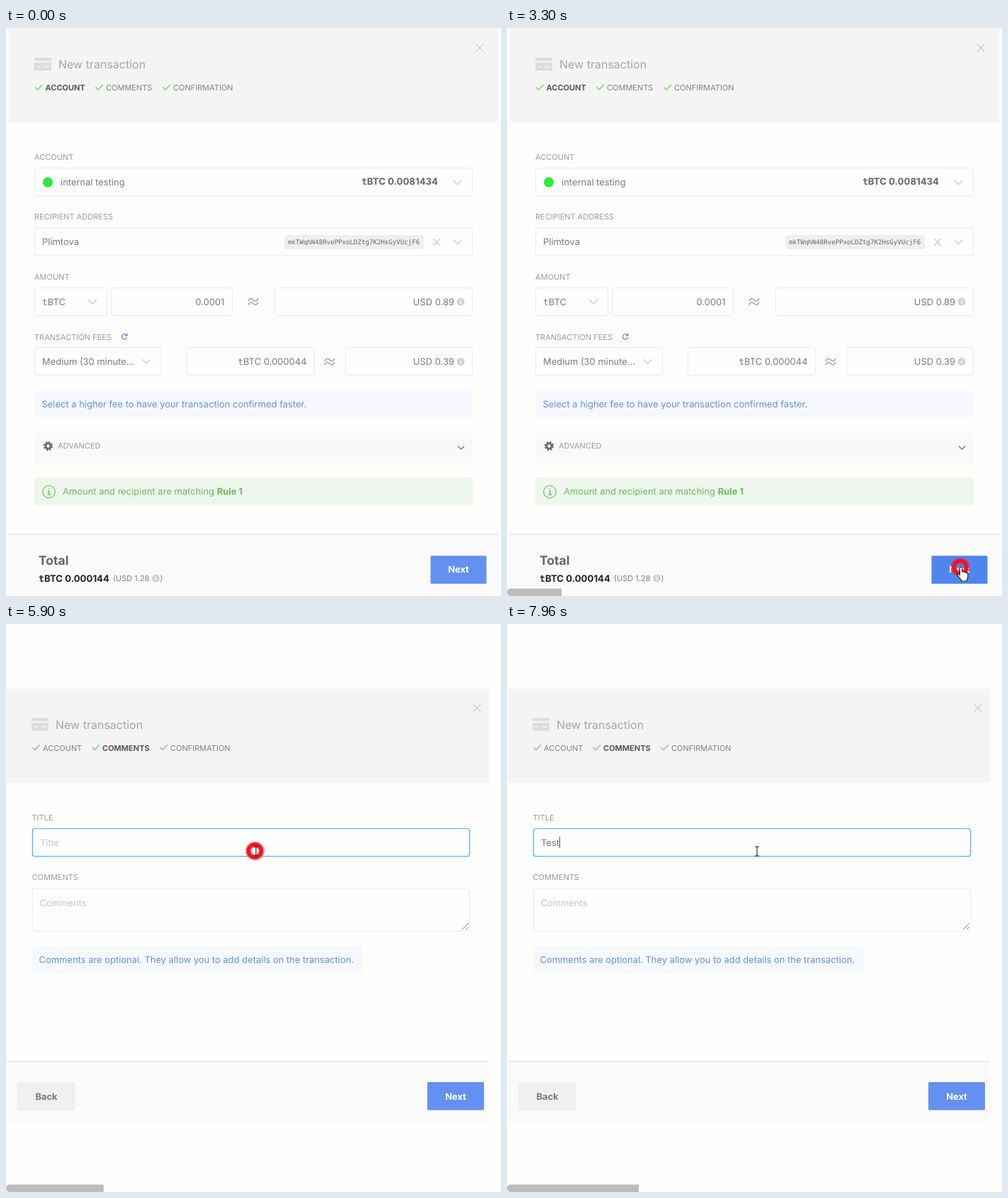
An HTML page that plays this animation: 699 by 801 pixels, repeating every 8000 ms.

```html
<!DOCTYPE html>
<html lang="en">
<head>
<meta charset="utf-8">
<title>New transaction</title>
<style>
  html, body { margin: 0; width: 100%; height: 100%; overflow: hidden; background: #fdfdfc; }
  svg { display: block; width: 699px; height: 801px; }
  text { font: 12.95px Inter, sans-serif; fill: #7a7a7a; white-space: pre; text-rendering: geometricPrecision; }
  .label { font-size: 11px; fill: #9c9c9c; }
  .step { font-size: 11px; fill: #808080; }
  .on { font-weight: 700; fill: #585858; }
  .heading { font-size: 16px; fill: #a6a6a6; }
  .bold { font-size: 13.2px; font-weight: 700; fill: #666; }
  .end { text-anchor: end; }
  .blue { fill: #6690f2; }
  .green { fill: #66bd58; }
  .hint { fill: #c6c6c6; }
  .mono { font-family: "DejaVu Sans Mono", monospace; }
  .button { font-weight: 700; text-anchor: middle; }
  .line { fill: none; stroke-linecap: round; stroke-linejoin: round; }
</style>
</head>
<body>
<svg viewBox="0 0 699 801">
  <g id="account"></g>
  <g id="comments"></g>
  <path id="progress" fill="#bcbcbc"/>
  <g id="ring" fill="none" stroke="#f5121c">
    <circle stroke-width="9" opacity=".4"/>
    <circle stroke-width="5.5"/>
  </g>
  <g id="cursor" stroke-linejoin="round">
    <path id="arrow" d="M0 0V15.5l3.6-3.4 2.4 5.4 2.2-1-2.4-5.2h5Z" fill="#fff" stroke="#333"/>
    <path id="hand" d="M-1.6 1.6a1.6 1.6 0 0 1 3.2 0V7c1-1 2.8-.5 3 .6 1-.8 2.6-.3 2.8.8 1-.5 2.4 0 2.4 1.6V13c0 3-1.5 4-1.5 7H1C0 17-4.5 13-5 11c0-1.4 1.6-1.7 2.4-.6l1 1.3Z" fill="#fff" stroke="#222" stroke-width="1.1"/>
    <path id="beam" d="M-3-6.5h2.5l.5.5.5-.5H3M0-6V6M-3 6.5h2.5L0 6l.5.5H3" fill="none" stroke="#222" stroke-width="1.1"/>
  </g>
</svg>
<script>
const LOOP = 8000;
const PAGE_SWITCH = 4130;
const $ = id => document.getElementById(id);

const text = (x, y, content, cls = '', attrs = '') =>
  `<text x="${x}" y="${y}" class="${cls}" ${attrs}>${content}</text>`;
const rect = (x, y, w, h, fill, r = 0, attrs = '') =>
  `<rect x="${x}" y="${y}" width="${w}" height="${h}" rx="${r}" fill="${fill}" ${attrs}/>`;
const line = (d, color, width = 1.3, attrs = '') =>
  `<path class="line" d="${d}" stroke="${color}" stroke-width="${width}" ${attrs}/>`;
const field = (x, y, w, h = 39) => rect(x + .5, y + .5, w - 1, h, '#fefefe', 3, 'stroke="#e9e9e9"');
const chevron = (x, y, color = '#cecece', r = 5.5) =>
  line(`M${x - r} ${y - r / 2}l${r} ${r}l${r} ${-r}`, color, 1.4);
const cross = (x, y, r, color) =>
  line(`M${x - r} ${y - r}l${2 * r} ${2 * r}m0 ${-2 * r}l${-2 * r} ${2 * r}`, color, 1.3);
const info = (x, y) =>
  `<circle cx="${x}" cy="${y}" r="5.5" fill="#d2d2d2"/>` +
  line(`M${x} ${y - .5}v3M${x} ${y - 2.8}v.1`, '#fff', 1.5);
const wave = (x, y) => line(`M${x - 6.8} ${y + 1.5}c2-4 4-4 6.8-1.5s4.8 2.5 6.8-1.5`, '#999', 1.3);
const approx = (x, y) => wave(x, y - 2.6) + wave(x, y + 2.6);
const ticker = amount => `<tspan class="mono">t</tspan>BTC${amount}`;

const header = (x, y, w, dx, dy, active, stepXs) => {
  const steps = ['ACCOUNT', 'COMMENTS', 'CONFIRMATION'].map((name, i) =>
    line(`M${stepXs[i] - 14} 84l3 3 6.5-6.5`, '#93db90', 1.8) +
    text(stepXs[i], 88, name, i === active ? 'step on' : 'step')).join('');
  return rect(x, y, w, 133, '#f4f4f4') + `<g transform="translate(${dx} ${dy})">` +
    rect(40, 42, 24, 18, '#dcdcdc', 1) + rect(40, 46, 24, 3, '#f1f1f1') +
    rect(43, 54, 6, 1.5, '#f4f4f4') + rect(53, 54, 8, 1.5, '#f4f4f4') +
    text(74, 57, 'New transaction', 'heading') + cross(669, 28, 4.7, '#cfcfcf') + steps + '</g>';
};

$('account').innerHTML =
  header(4, 0, 691, 0, 0, 0, [55.5, 141, 236]) +

  text(40, 186, 'ACCOUNT', 'label') + field(40, 197, 619) +
  '<circle cx="59" cy="217.5" r="7" fill="#2fe83a"/>' +
  text(77, 222, 'internal testing') +
  text(610, 221, ticker(' 0.0081434'), 'bold end') + chevron(637.5, 218) +

  text(40, 270, 'RECIPIENT ADDRESS', 'label') + field(40, 281.5, 619) +
  text(51, 306, 'Plimtova') + rect(393, 292, 197, 20, '#efefef', 4) +
  text(398, 305, 'mkTWqhN48RvePPxoLDZtg7K2HsGyVUcjF6', 'mono', 'style="font-size:9.1px;fill:#666"') +
  cross(608, 302, 4.5, '#c8c8c8') + chevron(637.5, 302) +

  text(40, 355, 'AMOUNT', 'label') + field(40, 366, 103) + field(148, 366, 172) + field(379, 366, 280) +
  text(51, 390.5, ticker('')) + chevron(122, 386) + text(308.5, 390.5, '0.0001', 'end') +
  approx(349, 386) + text(633, 390.5, 'USD 0.89', 'end') + info(642, 386) +

  text(40, 439.5, 'TRANSACTION FEES', 'label') +
  line('M170.3 433.3a3.7 3.7 0 1 0 .3 3.6M171 431v2.8h-2.8', '#6690f2', 1.3) +
  field(40, 450, 180) + field(255, 450, 181) + field(479, 450, 180) +
  text(51, 475, 'Medium (30 minute…') + chevron(198.5, 470.5) +
  text(424.5, 475, ticker(' 0.000044'), 'end') +
  approx(457, 470.5) + text(633, 475, 'USD 0.39', 'end') + info(642, 470.5) +

  rect(40, 511, 619, 38, '#f6f8fe', 3) +
  text(50.5, 534.5, 'Select a higher fee to have your transaction confirmed faster.', 'blue') +

  rect(40, 571, 619, 43, '#f9f9f9', 3) +
  '<circle cx="59.5" cy="589.5" r="5.6" fill="none" stroke="#6a6a6a" stroke-width="2" stroke-dasharray="2.4 2"/>' +
  '<circle cx="59.5" cy="589.5" r="3.6" fill="none" stroke="#6a6a6a" stroke-width="2.8"/>' +
  text(73, 593, 'ADVANCED', 'label') + chevron(642.5, 592, '#777', 4.2) +

  rect(40, 634, 619, 39, '#eef6ed', 3) +
  '<circle cx="60.5" cy="654" r="8.7" fill="none" stroke="#7cc670" stroke-width="1.3"/>' +
  line('M59.5 653h1.3v5M58.8 658h4M60.5 649.6v.2', '#66bd58', 1.4) +
  text(80, 658, 'Amount and recipient are matching <tspan font-weight="700">Rule 1</tspan>', 'green') +

  rect(4, 714, 691, 87, '#fafafa') + rect(4, 713, 691, 2, '#ebebeb') +
  text(46, 757, 'Total', 'bold', 'style="font-size:17.5px"') +
  text(46, 781, ticker(' 0.000144'), 'bold', 'style="fill:#222"') +
  text(151, 780, '(USD 1.28', 'step') + info(211.5, 776) + text(217.5, 780, ')', 'step') +
  rect(599.5, 744.2, 79, 39.6, '#6490f2', 1.5, 'id="next"') +
  text(639, 768, 'Next', 'button', 'style="fill:#fff"');

$('comments').innerHTML =
  header(1, 91, 681, -4, 90.5, 1, [56, 140, 236]) +
  text(36.5, 277, 'TITLE', 'label') +
  rect(36, 288, 620, 42, '#e6f4fd', 4) +
  rect(37.5, 288.5, 617, 39, '#fefefe', 3, 'stroke="#4cb5ef" stroke-width="1.2"') +
  text(48, 313, 'Title', 'hint', 'id="placeholder"') + text(48, 313, '', '', 'id="typed"') +
  rect(47, 300, 1, 16, '#555', 0, 'id="caret"') +
  text(36.5, 361, 'COMMENTS', 'label') + field(37, 372.5, 618, 60) +
  text(47.5, 398, 'Comments', 'hint') + line('M644.5 430.5l8-8M649.5 430.5l3-3', '#777', 1) +
  rect(37, 454, 466, 38, '#f6f8fe', 3) +
  text(46.5, 477.5, 'Comments are optional. They allow you to add details on the transaction.', 'blue') +
  rect(1, 617, 681, 86, '#fafafa') + rect(1, 616, 681, 2, '#ebebeb') +
  rect(16, 646, 82, 40, '#f0f0f0', 2) + text(57, 670.5, 'Back', 'button') +
  rect(595, 646, 80, 39.6, '#6490f2', 1.5) + text(635, 670.5, 'Next', 'button', 'style="fill:#fff"');

// time, x, y
const track = [
  [650, 643, 804], [830, 642, 783], [1100, 641, 760],
  [PAGE_SWITCH - .01, 641, 760], [PAGE_SWITCH, 529.5, 659],
  [4520, 529.5, 659], [5090, 353, 320.5], [LOOP, 353, 320.5]
];
const clicks = [{ at: 3170, x: 640, y: 760.5 }, { at: 5770, x: 351.5, y: 320 }];
const RING_TIME = 960;
const keys = [7300, 7450, 7640, 7800];
const caretOff = [[5560, 6130], [6690, 7220]];

const show = (el, visible) => el.setAttribute('visibility', visible ? 'visible' : 'hidden');
const within = (v, a, b) => v >= a && v < b;

function pointerAt(t) {
  if (t <= track[0][0]) return track[0].slice(1);
  const i = track.findIndex(p => p[0] > t);
  const [t0, x0, y0] = track[i - 1], [t1, x1, y1] = track[i];
  const u = (t - t0) / (t1 - t0);
  const k = u * u * (3 - 2 * u);
  return [x0 + (x1 - x0) * k, y0 + (y1 - y0) * k];
}

function drawPointer(t, second) {
  const [x, y] = pointerAt(t);
  const hover = !second && y < 784;
  const overText = second && (within(y, 288, 328) || within(y, 373, 433));
  $('cursor').setAttribute('transform', `translate(${x} ${y})`);
  show($('hand'), hover);
  show($('beam'), overText);
  show($('arrow'), !hover && !overText);
  $('next').setAttribute('fill', hover ? '#5284ee' : '#6490f2');
}

function drawRing(t) {
  const click = clicks.find(c => within(t, c.at, c.at + RING_TIME));
  show($('ring'), click);
  if (!click) return;
  const u = (t - click.at) / RING_TIME;
  $('ring').setAttribute('opacity', Math.min(1, 1.12 - .98 * u));
  for (const circle of $('ring').children) {
    circle.setAttribute('cx', click.x);
    circle.setAttribute('cy', click.y);
    circle.setAttribute('r', 4.5 + 33.5 * u);
  }
}

function drawTitle(t, second) {
  const typed = 'Test'.slice(0, keys.filter(k => t >= k).length);
  $('typed').textContent = typed;
  show($('placeholder'), second && !typed);
  show($('caret'), second && !caretOff.some(([a, b]) => within(t, a, b)));
  $('caret').setAttribute('x', typed ? 48 + $('typed').getComputedTextLength() : 47);
}

function draw(t) {
  const second = t >= PAGE_SWITCH;
  show($('account'), !second);
  show($('comments'), second);
  drawTitle(t, second);
  drawPointer(t, second);
  drawRing(t);
  const width = t * .02336, r = Math.min(5, width);
  $('progress').setAttribute('d', `M${width} 790.5V801H${r}a${r} 5.25 0 0 1 0-10.5Z`);
}

const start = performance.now();
function tick() {
  draw((performance.now() - start) % LOOP);
  requestAnimationFrame(tick);
}
tick();
</script>
</body>
</html>
```
